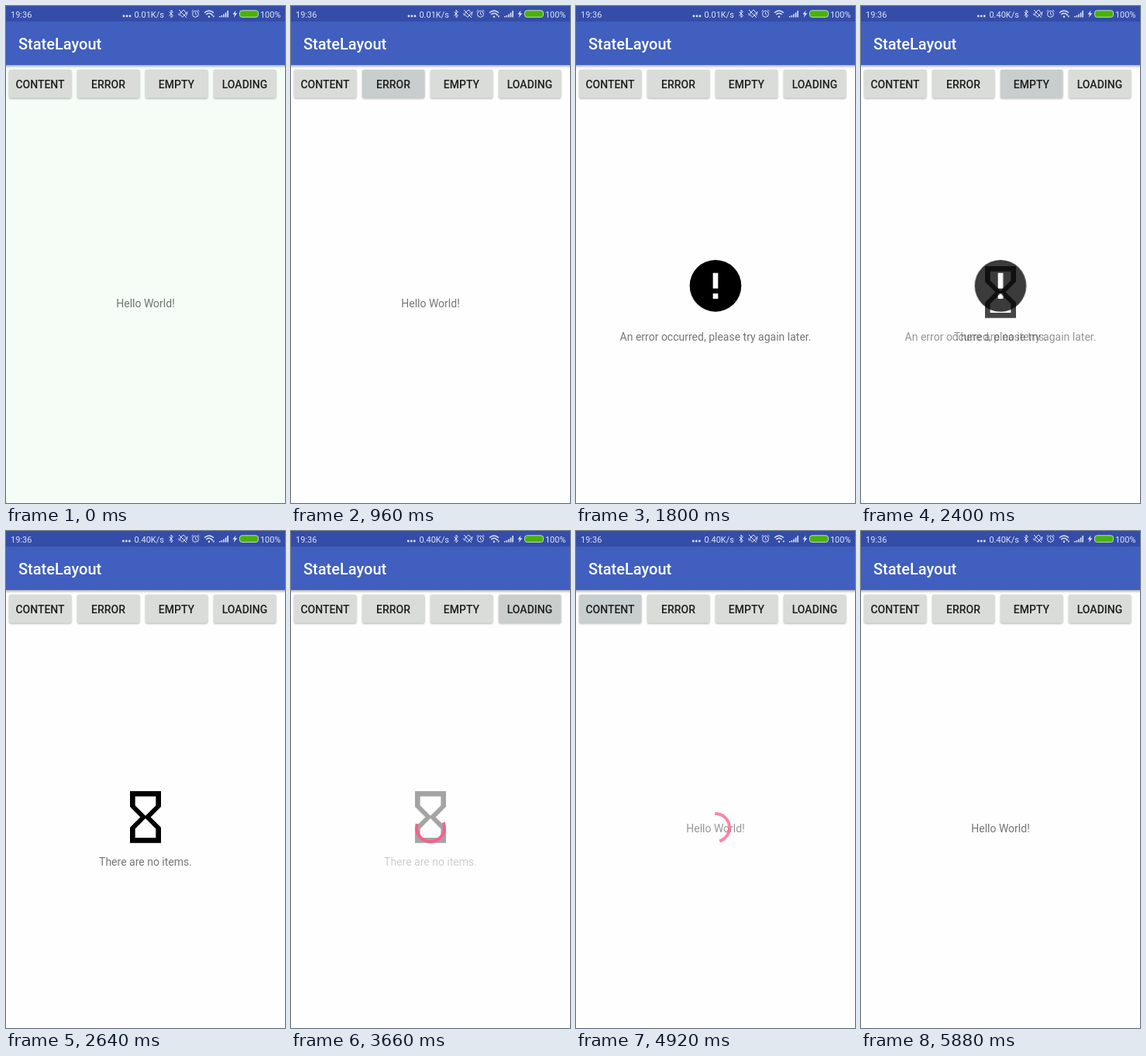
Recreate the animation shown at these times as an HTML page. Size 360 px wide and 640 px high, loop 6000 ms.

```html
<!DOCTYPE html>
<html lang="en">
<head>
<meta charset="utf-8">
<title>StateLayout</title>
<style>
  html, body { margin: 0; width: 100%; height: 100%; overflow: hidden; background: #fefefe; }
  svg { display: block; width: 360px; height: 640px; font-family: Roboto, sans-serif; }
  .mid { text-anchor: middle; font-size: 14px; }
  .body { fill: #000; fill-opacity: .54; }
  .label { fill: #1d1f1d; font-weight: 500; }
  .status { fill: #dfe4f5; font-size: 11px; }
  .line { fill: none; stroke: #dfe4f5; stroke-width: 1; }
</style>
</head>
<body>
<svg viewBox="0 0 360 640">
  <defs>
    <linearGradient id="shade" x2="0" y2="1">
      <stop offset="0" stop-color="#000" stop-opacity=".3"/>
      <stop offset="1" stop-color="#000" stop-opacity="0"/>
    </linearGradient>
    <filter id="soft" x="-10%" y="-20%" width="120%" height="140%">
      <feGaussianBlur stdDeviation="1"/>
    </filter>
  </defs>
  <rect id="page" width="360" height="640"/>

  <!-- app bar -->
  <rect y="76" width="360" height="4" fill="url(#shade)"/>
  <rect width="360" height="76" fill="#405fbe"/>
  <rect width="360" height="20" fill="#344da9"/>
  <text x="16" y="56" font-size="20" font-weight="500" fill="#fff">StateLayout</text>

  <!-- status bar -->
  <g class="status">
    <text x="6" y="14.5">19:36</text>
    <g id="dots">
      <circle cx="152" cy="13" r="1.4"/><circle cx="156" cy="13" r="1.4"/><circle cx="160" cy="13" r="1.4"/>
    </g>
    <text id="speed" x="204" y="14.5" text-anchor="end"></text>
    <text x="354.5" y="14.5" text-anchor="end">100%</text>
    <path d="M275 14.5v-1.5h1.6v1.5zM277.6 14.5v-2.5h1.6v2.5zM280.2 14.5v-4h1.6v4zM282.8 14.5v-6h1.6v6zM285.4 14.5v-8.5h1.6v8.5z"/>
    <path d="M296.6 5.5l-4 5.2h2.4l-1.2 4.3 4.6-5.8h-2.7z"/>
    <path id="up" d="M264.6 12.2l1.4-2.2 1.4 2.2z"/>
    <path id="down" d="M266.4 12.6h2.8l-1.4 2.4z"/>
    <circle cx="262" cy="13.7" r="1.2"/>
  </g>
  <g class="line">
    <path d="M210.5 7.5l5 5-2.5 2.3v-9.6l2.5 2.3-5 5"/>
    <path d="M225.5 8l3.8-3 3.2 4-4.8 5.5-3.4-3.8zM223 5l10 10M222.3 9.5l1.5 3M234 7l-1.2 5.5"/>
    <circle cx="244.5" cy="10.3" r="4"/>
    <path d="M244.5 8v2.6l1.8 1M239.5 7l2.2-2M249.5 7l-2.2-2"/>
    <path d="M256 8.8q6-5.6 12 0M258.2 11q3.8-3.6 7.6 0" stroke-width="1.3"/>
  </g>
  <rect x="301.5" y="5.8" width="24" height="8.6" rx="3" fill="#48b309" stroke="#c4d5c8"/>

  <g id="buttons"></g>

  <!-- states -->
  <g id="content"><text class="mid body" x="180" y="387.5">Hello World!</text></g>
  <g id="error">
    <path transform="translate(140 320.3) scale(3.3333)" d="M12 2a10 10 0 1 0 0 20a10 10 0 1 0 0-20zm1 15h-2v-2h2zm0-4h-2V7h2z" fill-rule="evenodd"/>
    <text class="mid body" x="180" y="431">An error occurred, please try again later.</text>
  </g>
  <g id="empty">
    <path transform="translate(140 328.4) scale(3.3333)" d="M6 2v6l4 4-4 4v6h12v-6l-4-4 4-4V2zm10 14.5V20H8v-3.5l4-4zm-4-5l-4-4V4h8v3.5z" fill-rule="evenodd"/>
    <text class="mid body" x="180" y="431">There are no items.</text>
  </g>
  <g id="loading">
    <path id="arc" fill="none" stroke="#fb5e89" stroke-width="4" stroke-linecap="square"/>
  </g>
</svg>
<script>
const LOOP = 6000, STEP = 60, FADE = 360;
const $ = id => document.getElementById(id);
const clamp = x => Math.max(0, Math.min(1, x));

// press: finger down; click: the state starts to change
const states = [
  { id: 'content', label: 'CONTENT', press: 4620, click: 4740, next: 1127 },
  { id: 'error', label: 'ERROR', press: 840, click: 1127, next: 2227 },
  { id: 'empty', label: 'EMPTY', press: 2220, click: 2227, next: 3370 },
  { id: 'loading', label: 'LOADING', press: 3300, click: 3370, next: 4740 }
];

states.forEach((s, i) => {
  const x = 4 + 88 * i;
  const box = (y, extra) => `<rect x="${x}" y="${y}" width="80.3" height="36.6" rx="2" ${extra}/>`;
  $('buttons').insertAdjacentHTML('beforeend',
    box(82.8, 'fill="#000" opacity=".3" filter="url(#soft)"') +
    box(82, 'fill="#dadcd9"') +
    box(82, `id="ripple${i}" fill="#c8cecd"`) +
    `<text class="mid label" x="${x + 40}" y="105.5">${s.label}</text>`);
  s.view = $(s.id);
  s.ripple = $('ripple' + i);
});

// cubic-bezier(.4, 0, .2, 1), solved by bisection
function ease(x) {
  let lo = 0, hi = 1, u = x;
  for (let i = 0; i < 20; i++) {
    u = (lo + hi) / 2;
    const at = 1.2 * u * (1 - u) ** 2 + .6 * u * u * (1 - u) + u ** 3;
    if (at < x) lo = u; else hi = u;
  }
  return 3 * u * u * (1 - u) + u ** 3;
}

// decelerating fade in, accelerating fade out
function alpha(s, t) {
  const shown = 1 - (1 - clamp((t - s.click) / FADE)) ** 2;
  const kept = 1 - clamp((t - s.next) / FADE) ** 2;
  return s.click < s.next ? Math.min(shown, kept) : Math.max(shown, kept);
}

function ripple(s, t) {
  return clamp((t - s.press + STEP) / 150) * (t >= s.press) * clamp((s.click + 410 - t) / 130);
}

function arc(t) {
  const cycle = 1333, half = cycle / 2, phase = t % cycle;
  const turn = -90 + t * 720 / 4444 + t * 90 / cycle;
  const from = turn + 270 * ease(clamp((phase - half) / half));
  const to = Math.max(from + 1, turn + 270 * ease(clamp(phase / half)));
  const point = deg => {
    const a = deg * Math.PI / 180;
    return `${180 + 18 * Math.cos(a)} ${382 + 18 * Math.sin(a)}`;
  };
  return `M${point(from)}A18 18 0 ${to - from > 180 ? 1 : 0} 1 ${point(to)}`;
}

function draw(t) {
  $('page').setAttribute('fill', t < 120 ? '#f5fdf6' : '#fefefe');
  for (const s of states) {
    s.view.setAttribute('opacity', alpha(s, t));
    s.ripple.setAttribute('opacity', ripple(s, t));
  }
  $('arc').setAttribute('d', arc(Math.max(0, t - 3335)));

  const fast = t >= 2220;
  $('speed').textContent = fast ? '0.40K/s' : '0.01K/s';
  $('dots').setAttribute('transform', `translate(${fast ? -.7 : 0})`);
  const both = t < 1080 || (t >= 2040 && t < 3960) || t >= 5880;
  $('up').setAttribute('opacity', both ? 1 : 0);
  $('down').setAttribute('opacity', both || t >= 4920 ? 1 : 0);
}

const start = performance.now();
function tick() {
  const t = (performance.now() - start) % LOOP;
  draw(Math.floor(t / STEP) * STEP);
  requestAnimationFrame(tick);
}
tick();
</script>
</body>
</html>
```
